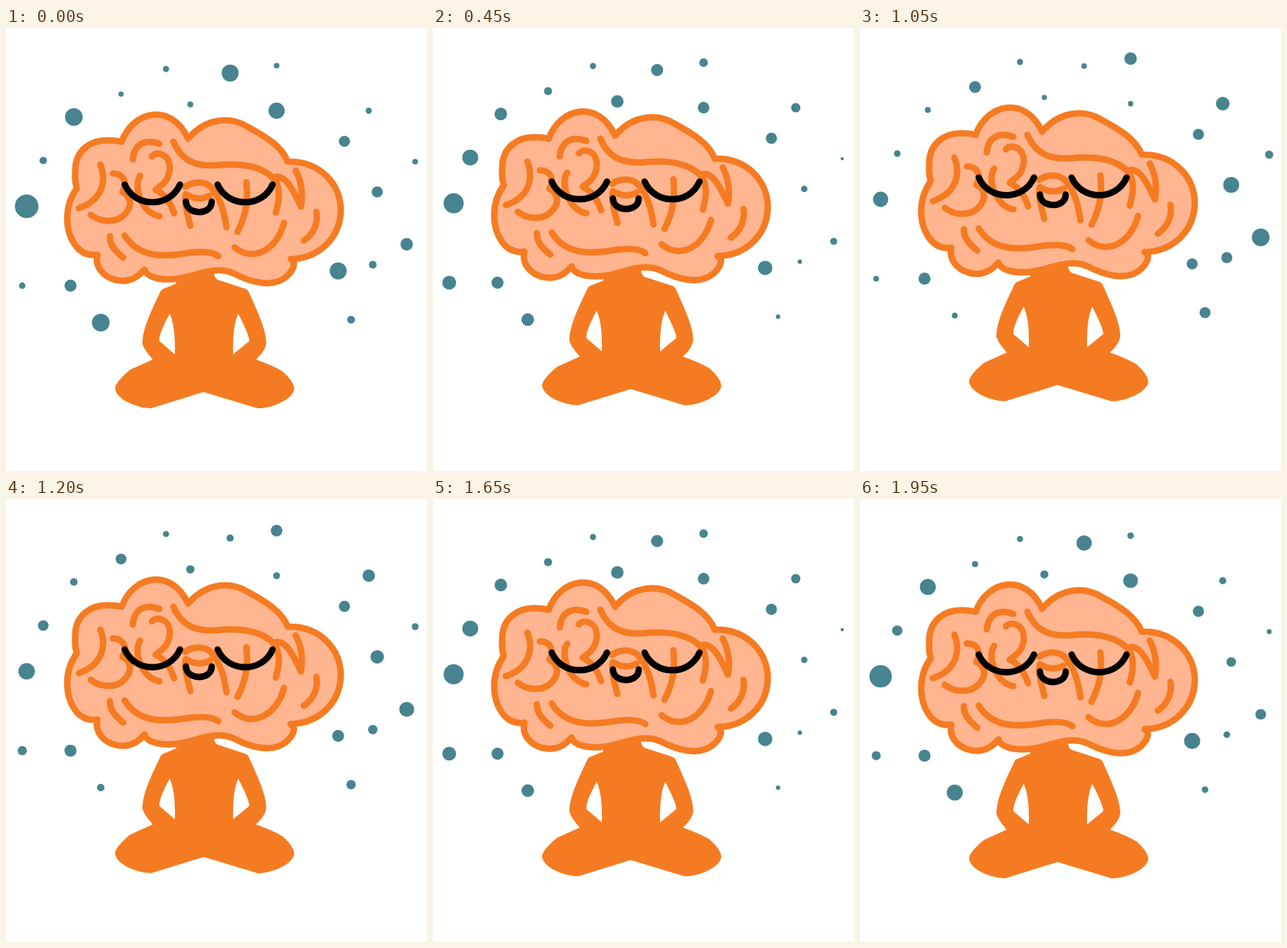
These frames come from a looping animation (571x600 px, 2100 ms). An HTML page:

```html
<!DOCTYPE html>
<html lang="en">
<head>
<meta charset="utf-8">
<title>Meditating brain</title>
<style>
  html, body { margin: 0; width: 100%; height: 100%; overflow: hidden; background: #fff; }
  svg { display: block; }
  .line { fill: none; stroke: #f57b22; stroke-width: 8.7; stroke-linecap: round; stroke-linejoin: round; }
  .line.brain { fill: #ffb58f; }
  .line.face { stroke: #000; }
</style>
</head>
<body>
<svg width="571" height="600" viewBox="0 0 571 600">
  <g id="scene">
    <g id="dots" fill="#47848f"></g>

    <path fill="#f57b22" fill-rule="evenodd" d="M231 330V346L214 353Q210 354 208 360
      C198 381 185 407 185 427Q186 434 199 449L168 463Q148 480 148 488C149 504 180 515 197 515
      L268 493L341 515C358 516 391 503 391 488Q390 478 375 465Q364 458 339 449Q352 437 353 427
      C353 408 341 384 330 359Q328 354 324 353L287 341Q282 338 282 330Z
      M222 387Q207 414 208 424L229 442Q230 404 222 387Z
      M315 387Q307 404 308 442L330 424Q330 416 315 387Z"/>

    <path class="line brain" d="M157 154C172 112 224 100 247 150
      C270 122 304 119 328 134C352 147 374 160 382 181C428 180 455 214 454 248
      C453 284 425 312 386 313C395 318 389 329 380 337C361 353 331 344 308 332
      C281 321 258 337 230 340C208 342 190 337 188 327C172 346 155 343 148 341
      C132 337 120 323 124 307C95 311 83 280 83 258C83 240 88 228 96 217
      C92 205 94 202 94 189C96 165 115 152 137 152Q148 152 157 154Z"/>

    <path class="line" d="M128 185C136 205 133 232 99 244
      M145 197C158 197 166 208 158 222C170 228 171 240 163 250C150 267 126 262 115 253
      M172 178C174 156 190 150 208 157
      M198 174C203 166 224 170 222 192C220 209 210 213 203 219C216 225 223 236 228 251
      M182 200C172 215 184 251 208 255
      M227 154C240 184 262 187 285 186C320 182 350 188 365 206C373 220 370 235 366 250
      M362 203C374 198 384 206 400 242C403 225 402 210 393 193
      M326 209C329 235 325 255 314 276
      M244 225C241 237 247 255 250 268
      M243 215C255 207 272 207 280 218C292 233 296 250 299 270
      M248 227C256 232 268 232 276 227
      M161 281C180 312 215 310 245 305C265 302 280 303 288 309
      M141 282C140 293 148 302 159 311
      M310 297C335 318 368 300 377 264
      M421 249C424 265 416 280 404 288"/>

    <path class="line face" d="M161 212C175 244 222 244 236 212
      M287 212C301 244 348 244 361.5 212M244 235C245 254 279 254 279 235"/>
  </g>
</svg>
<script>
  const STEP = 150, HALF = 7, RISE = 9.5;

  // scale rules over the steps of one rise
  const ramp = (from, to, steps = HALF) => k => from + (to - from) * k / steps;
  const turn = (from, mid, to, at) => {
    const first = ramp(from, mid, at), second = ramp(mid, to, HALF - at);
    return k => k < at ? first(k) : second(k - at);
  };

  // dots that breathe alike share a rule; each is x, y, full radius
  const groups = [
    { scale: ramp(1, 0.33), dots: [[304, 61, 11.5], [367, 112, 11], [92, 120.5, 12], [128.5, 399, 12]] },
    { scale: ramp(1, 0.65), dots: [[28, 241.5, 16], [450.5, 329, 11.5]] },
    { scale: ramp(1, 1), dots: [[217, 55.5, 4.2], [459, 153.5, 7.6], [87.5, 349, 8.2]] },
    { scale: ramp(0.45, 1), dots: [[367, 51, 8.5], [156, 89.5, 8], [492, 112, 9.2]] },
    { scale: turn(0.4, 1, 0.35, 4), dots: [[250, 103.5, 10], [50.5, 179.5, 12.7], [22, 349, 11]] },
    { scale: turn(0.7, 0.4, 1, 3), dots: [[555, 181, 5.5], [503.5, 222, 10.8], [543.5, 293, 12], [497.5, 320.5, 7.5], [468, 395, 7.5]] }
  ];

  const scene = document.getElementById("scene");
  const layer = document.getElementById("dots");

  const circles = groups.flatMap(({ scale, dots }) => dots.map(([x, y, size]) => {
    const el = document.createElementNS("http://www.w3.org/2000/svg", "circle");
    el.setAttribute("cx", x);
    el.setAttribute("cy", y);
    layer.append(el);
    return { el, size, scale };
  }));

  function draw(now) {
    const step = Math.floor(now / STEP) % (2 * HALF);
    const k = HALF - Math.abs(HALF - step);
    scene.setAttribute("transform", `translate(0 ${-RISE * k / HALF})`);
    for (const { el, size, scale } of circles) el.setAttribute("r", size * scale(k));
  }

  const start = performance.now();
  function loop() {
    draw(performance.now() - start);
    requestAnimationFrame(loop);
  }
  loop();
</script>
</body>
</html>
```
